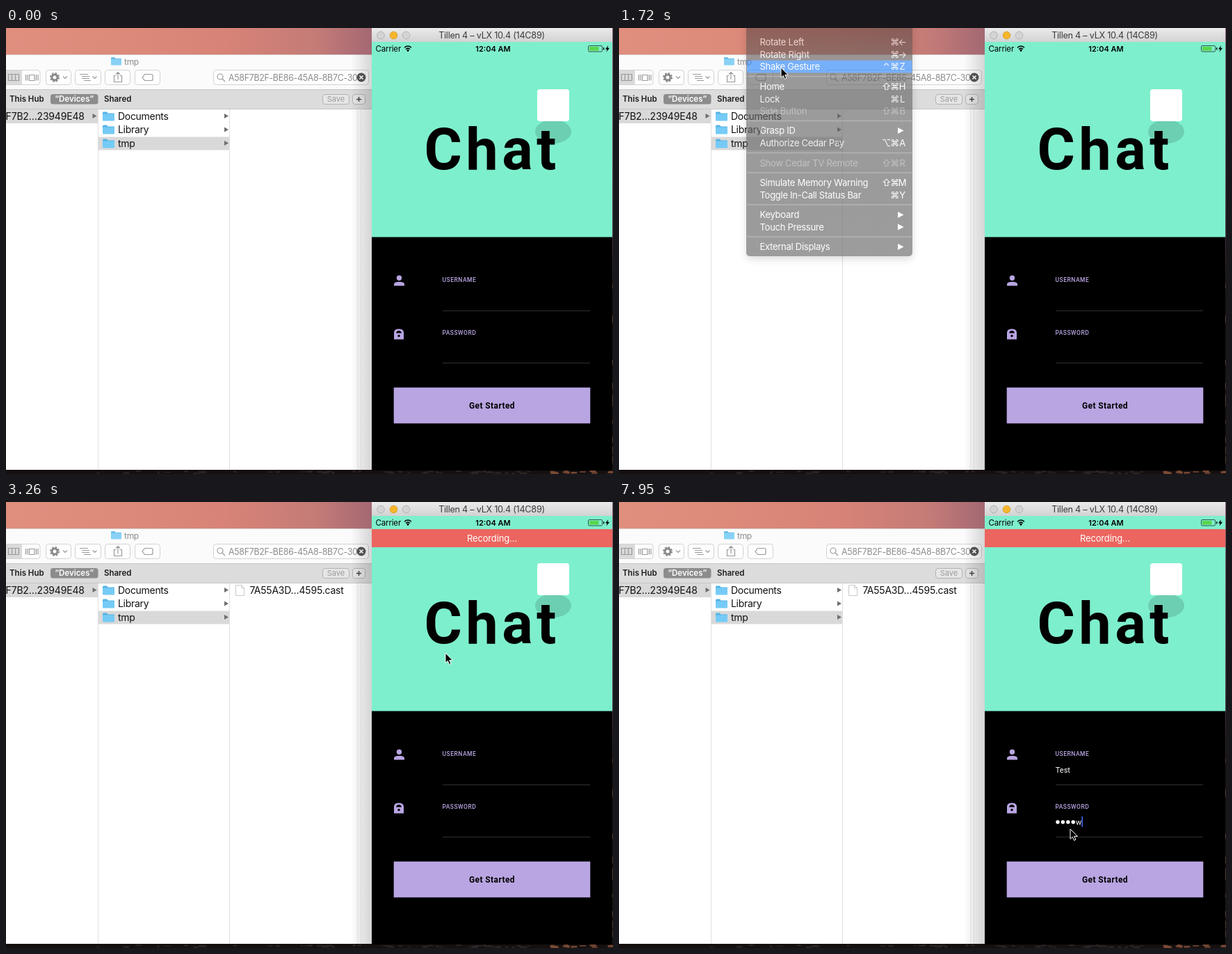
Write an HTML page that moves like this. It is 873 px wide and 641 px high and loops after 8000 ms.

```html
<!DOCTYPE html>
<html lang="en">
<head>
<meta charset="utf-8">
<title>Recording a sign-in</title>
<style>
  html, body { margin: 0; width: 100%; height: 100%; overflow: hidden; background: #15100f; }
  svg { display: block; width: 100vw; height: 100vh; }
  text { font: 14px Inter, "DejaVu Sans", sans-serif; letter-spacing: -.3px; white-space: pre; }
  .menu text { font-size: 13px; letter-spacing: -.27px; fill: #fff; }
  .menu .off text { fill: #a2a2a2; }
  .scope text { font-size: 11.5px; font-weight: 600; letter-spacing: 0; }
  .app text { font-family: Roboto, "Open Sans", sans-serif; letter-spacing: 0; }
  .app .label { font-size: 8.5px; font-weight: 500; letter-spacing: .5px; fill: #b8a5e2; }
  .app .typed { font-size: 11px; fill: #fff; }
  .mid { text-anchor: middle; }
  .end { text-anchor: end; }
  .btn { fill: #fefefe; stroke: #d2d2d2; }
  .ink { fill: none; stroke: #9a9a9a; stroke-width: 1.2; }
</style>
</head>
<body>
<svg viewBox="0 0 873 641" xmlns="http://www.w3.org/2000/svg">
  <defs>
    <linearGradient id="sky">
      <stop offset="0" stop-color="#e08f7f"/><stop offset=".3" stop-color="#dc8a7a"/>
      <stop offset=".6" stop-color="#d78377"/><stop offset=".85" stop-color="#c47b77"/>
      <stop offset="1" stop-color="#a36873"/>
    </linearGradient>
    <linearGradient id="side" x2="0" y2="1">
      <stop offset="0" stop-color="#8a6274"/><stop offset=".45" stop-color="#4a3844"/>
      <stop offset=".6" stop-color="#1c1414"/>
    </linearGradient>
    <linearGradient id="edge">
      <stop offset="0" stop-opacity="0"/><stop offset="1" stop-opacity=".15"/>
    </linearGradient>
    <linearGradient id="bar" x2="0" y2="1">
      <stop offset="0" stop-color="#ebebeb"/><stop offset="1" stop-color="#d2d2d2"/>
    </linearGradient>
    <linearGradient id="panel" x2="0" y2="1">
      <stop offset="0" stop-color="#6b4743"/><stop offset=".1" stop-color="#6a5855"/>
      <stop offset=".2" stop-color="#686666"/><stop offset="1" stop-color="#696969"/>
    </linearGradient>
    <clipPath id="search"><rect x="298" y="60" width="207" height="22"/></clipPath>
    <clipPath id="screen"><rect x="526" y="20" width="346" height="616"/></clipPath>
    <g id="folder">
      <path d="M0 1.5Q0 0 1.5 0H6L7.5 2H16Q17 2 17 3V4H0Z" fill="#55b4e6"/>
      <rect y="3" width="17" height="10" rx="1" fill="#75cbf6"/>
    </g>
    <path id="tri" d="M-3-3.5 3 0-3 3.5Z"/>
  </defs>

  <!-- desktop -->
  <rect width="527" height="40" fill="url(#sky)"/>
  <rect x="872" width="1" height="641" fill="url(#side)"/>
  <g id="dusk"></g>

  <!-- file window -->
  <rect y="38" width="526" height="597" fill="#fff"/>
  <rect y="38" width="526" height="50" fill="#fbfbfb"/>
  <path d="M0 38.5H526" stroke="#b9a5a3" stroke-opacity=".5"/>
  <use href="#folder" transform="translate(151 42) scale(.88)" opacity=".85"/>
  <text x="170" y="52.5" fill="#8a8a8a" style="font-size:12px">tmp</text>
  <g>
    <rect class="btn" x="-8" y="60.5" width="57" height="21" rx="4"/>
    <path d="M0 61H23V81H0Z" fill="#dadada"/>
    <path class="ink" d="M3.5 66.5H18.5V75.5H3.5ZM8.5 66.5V75.5M13.5 66.5V75.5M28.5 67V75.5M31 67V75.5M33.5 67.5H41V75.5H33.5ZM43.5 67V75.5M46 67V75.5"/>
    <rect class="btn" x="57.5" y="60.5" width="36" height="21" rx="4"/>
    <circle cx="70" cy="71" r="4" fill="none" stroke="#8a8a8a" stroke-width="3"/>
    <circle cx="70" cy="71" r="6" fill="none" stroke="#8a8a8a" stroke-width="2" stroke-dasharray="2.4 2.312"/>
    <rect class="btn" x="99.5" y="60.5" width="37" height="21" rx="4"/>
    <path class="ink" d="M106 66.5H118M109 69.5H120M109 72.5H120M112 75.5H122"/>
    <path class="ink" d="M82 69.5 85 72.5 88 69.5M124.5 69.5 127.5 72.5 130.5 69.5"/>
    <rect class="btn" x="142.5" y="60.5" width="36" height="21" rx="4"/>
    <path class="ink" d="M158 68.5H155.5V77.5H166.5V68.5H164M161 74V63.5M158 66.5 161 63.5 164 66.5"/>
    <rect class="btn" x="185.5" y="60.5" width="36" height="21" rx="4"/>
    <path class="ink" d="M199.5 66.5H209Q211 66.5 211 68.5V73.5Q211 75.5 209 75.5H199.5L196 71Z"/>
    <rect class="btn" x="298.5" y="60.5" width="223" height="21" rx="4"/>
    <circle class="ink" cx="308" cy="70" r="4"/><path class="ink" d="M311 73 315 77"/>
    <text x="320" y="75.5" clip-path="url(#search)" fill="#8d8d8d" style="font-size:12.4px">A58F7B2F-BE86-45A8-8B7C-30D1</text>
  </g>
  <g class="scope">
    <rect y="88" width="526" height="29" fill="#dcdcdc"/>
    <path d="M0 88.5H526M0 116.5H526" stroke="#c6c6c6"/>
    <text x="5" y="106" fill="#1c1c1c">This Hub</text>
    <rect x="64" y="95" width="68.5" height="14.5" rx="3.5" fill="#8c8c8c"/>
    <text class="mid" x="98.2" y="106" fill="#fff">“Devices”</text>
    <text x="141" y="106" fill="#1c1c1c">Shared</text>
    <rect x="455.5" y="95.5" width="38" height="14" rx="3.5" fill="#e6e6e6" stroke="#b4b4b4"/>
    <text class="mid" x="474.5" y="106" fill="#9c9c9c" style="font-size:11px;font-weight:400">Save</text>
    <rect x="498.5" y="95.5" width="18" height="14" rx="3.5" fill="#e6e6e6" stroke="#b4b4b4"/>
    <path d="M504 102.5H511M507.5 99V106" stroke="#444" stroke-width="1.5"/>
  </g>
  <path d="M0 117H132V137H0ZM133 156.5H321V175.5H133Z" fill="#d9d9d9"/>
  <path d="M132.5 117V635M321.5 117V635" stroke="#e0e0e0"/>
  <path d="M505 117H526V635H505Z" fill="#fafafa"/>
  <path d="M505.5 117V635M510.5 117V635" stroke="#ececec"/>
  <g fill="#111">
    <text class="end" x="112.7" y="132" style="letter-spacing:-.2px">F7B2…23949E48</text>
    <text x="161" y="132">Documents</text>
    <text x="161" y="151">Library</text>
    <text x="161" y="171">tmp</text>
  </g>
  <use href="#folder" x="139" y="120.5"/>
  <use href="#folder" x="139" y="139.5"/>
  <use href="#folder" x="139" y="159.5"/>
  <g fill="#6e6e6e">
    <use href="#tri" x="127.5" y="126.5"/><use href="#tri" x="317" y="126.5"/>
    <use href="#tri" x="317" y="146"/><use href="#tri" x="317" y="165.5"/>
  </g>
  <g id="file">
    <path d="M330.5 119.5H338.5L342.5 123.5V134.5H330.5ZM338.5 119.5V123.5H342.5" fill="#fff" stroke="#c9c9c9"/>
    <text x="350.5" y="132" fill="#111" style="letter-spacing:-.2px">7A55A3D…4595.cast</text>
  </g>
  <rect x="496" y="38" width="30" height="597" fill="url(#edge)"/>
  <circle cx="511" cy="71" r="6.5" fill="#505050"/>
  <path d="M508.5 68.5 513.5 73.5M513.5 68.5 508.5 73.5" stroke="#fff" stroke-width="1.5"/>

  <!-- phone window -->
  <g class="app">
    <rect x="526" width="346" height="636"/>
    <rect x="526" width="346" height="20" fill="url(#bar)"/>
    <g fill="#d4d4d4" stroke="#b2b2b2">
      <circle cx="539" cy="10.5" r="5.3"/><circle cx="575.5" cy="10.5" r="5.3"/>
      <circle cx="557.5" cy="10.5" r="5.3" fill="#f6b62c" stroke="#dc9d22"/>
    </g>
    <text class="mid" x="698.5" y="15" fill="#3c3c3c" style="font:12.7px Inter,sans-serif;letter-spacing:-.27px">Tillen 4 – vLX 10.4 (14C89)</text>
    <rect x="526" y="20" width="346" height="280.5" fill="#7eefcd"/>
    <text x="531.5" y="34" style="font:11.5px Inter,sans-serif;letter-spacing:-.15px">Carrier</text>
    <path d="M573 28.2Q578 23.8 583 28.2M575 30.5Q578 27.8 581 30.5" fill="none" stroke="#000" stroke-width="1.5"/>
    <path d="M576 32 578 30.5 580 32 578 34.2Z"/>
    <text class="mid" x="700.5" y="34" style="font:600 11px Inter,sans-serif">12:04 AM</text>
    <rect x="837.5" y="25.5" width="20" height="8.5" rx="1.5" fill="none" stroke="#2e5548"/>
    <rect x="839" y="27" width="13.5" height="5.5" fill="#58d64c"/>
    <path d="M859 28H860.3V31.5H859ZM866 25 862 30.5H864.5L863.5 34.5 868 28.7H865.2Z"/>
    <ellipse cx="787" cy="149" rx="26" ry="17" fill="#6ccfb2"/>
    <text x="601.5" y="203" style="font-size:83px;font-weight:700;letter-spacing:5.5px">Chat</text>
    <rect x="764" y="88" width="46" height="46" rx="4" fill="#fff"/>
    <g clip-path="url(#screen)">
      <g id="banner">
        <rect x="526" width="346" height="26" fill="#ec655f"/>
        <text class="mid" x="699" y="17.5" fill="#fff" style="font:13px Inter,sans-serif;letter-spacing:-.15px">Recording…</text>
      </g>
    </g>
    <g fill="#b8a5e2">
      <circle cx="565.5" cy="359.3" r="3.7"/>
      <path d="M558 370.5V368.5Q558 364.8 565.5 364.8T573 368.5V370.5Z"/>
      <path d="M558 447.5V437.5Q558.5 432.5 565 432.5T572 437.5V447.5Z"/>
    </g>
    <path d="M561 438.5Q561.5 435 565 435T569 438.5Z"/>
    <circle cx="565" cy="442.5" r="1.7"/>
    <text class="label" x="627.5" y="364.5">USERNAME</text>
    <text class="label" x="627.5" y="440.5">PASSWORD</text>
    <path d="M628 406.5H840M628 481.5H840" stroke="#303030"/>
    <rect x="557.7" y="516.7" width="282.6" height="51.6" fill="#b8a5e2"/>
    <text class="mid" x="699" y="547.2" style="font-size:12px;font-weight:700;letter-spacing:.4px">Get Started</text>
    <text class="typed" id="user" x="627.8" y="389"></text>
    <g id="dots" fill="#fff"></g>
    <text class="typed" id="pass" y="464"></text>
    <rect id="caret" width="1.6" fill="#4468e8"/>
  </g>

  <!-- menu -->
  <g class="menu" id="menu" style="filter:drop-shadow(0 4px 6px rgba(0,0,0,.22))">
    <rect x="183" y="-10" width="239" height="338" rx="5" fill="url(#panel)"/>
    <rect id="pick" x="184" width="237.5" height="17.8" fill="#3289fa"/>
  </g>

  <path id="cursor" d="M0 0V14.3L3.3 11.3 5.5 16.4 7.9 15.4 5.7 10.4H10.3Z" fill="#000" stroke="#fff"/>
</svg>
<script>
const LOOP = 8000;
const NS = 'http://www.w3.org/2000/svg';
const $ = id => document.getElementById(id);

function add(parent, tag, attrs, text) {
  const node = document.createElementNS(NS, tag);
  for (const k in attrs) node.setAttribute(k, attrs[k]);
  if (text) node.textContent = text;
  return parent.appendChild(node);
}

// label, centre y, modifier, key; '>' opens a submenu, '-' marks a disabled row
const ROWS = [
  ['Rotate Left', 20, '', '←'], ['Rotate Right', 38, '', '→'], ['Shake Gesture', 55.5, '⌃', 'Z'],
  ['Home', 84, '⇧', 'H'], ['Lock', 102, '', 'L'], ['Side Button', 119, '⇧', 'B', '-'],
  ['Grasp ID', 147.5, '>'], ['Authorize Cedar Pay', 165, '⌥', 'A'],
  ['Show Cedar TV Remote', 194, '⇧', 'R', '-'],
  ['Simulate Memory Warning', 222.5, '⇧', 'M'], ['Toggle In-Call Status Bar', 240, '', 'Y'],
  ['Keyboard', 268.5, '>'], ['Touch Pressure', 286, '>'], ['External Displays', 314.5, '>']
];
for (const [label, y, mod, key, off] of ROWS) {
  const row = add($('menu'), 'g', { class: off ? 'off' : '' });
  const base = y + 4.6;
  add(row, 'text', { x: 202.5, y: base }, label);
  if (mod === '>') {
    add(row, 'path', { d: `M401 ${y - 4.5}L409.5 ${y}L401 ${y + 4.5}Z`, fill: '#fff' });
    continue;
  }
  add(row, 'text', { x: 384.5, y: base, class: 'mid' }, mod);
  add(row, 'text', { x: 396.5, y: base, class: 'mid' }, '⌘');
  add(row, 'text', { x: 407.5, y: base, class: 'mid' }, key);
}
for (const y of [69.5, 133.5, 179.5, 208, 254, 300])
  add($('menu'), 'path', { d: `M184 ${y}H421.5`, stroke: '#8e8e8e', 'stroke-width': 1.6 });

// specks of the evening scene below the windows
let seed = 7;
const rnd = () => (seed = seed * 16807 % 2147483647) / 2147483647;
for (let i = 0; i < 70; i++) {
  const x = 130 + rnd() * 740, warm = x > 780;
  add($('dusk'), 'rect', {
    x, y: 636 + rnd() * 3, width: 3 + rnd() * 8, height: 1 + rnd() * 2,
    fill: warm ? '#7c4a36' : '#2b2425'
  });
}
for (let i = 0; i < 12; i++)
  add($('dusk'), 'rect', { x: 872, y: 300 + rnd() * 330, width: 1, height: 4 + rnd() * 8, fill: '#5a3c2e' });

const dots = [0, 1, 2, 3].map(i => add($('dots'), 'circle', { cx: 631 + i * 7.4, cy: 460, r: 2.7 }));

// start, end, number of steps, points along the way
const MOVES = [
  [780, 1130, 7, [[250, -22], [247, -12], [243, 2], [240, 16], [237, 30], [235, 43], [234, 51], [233, 57]]],
  [2190, 2780, 11, [[233, 57], [250, 60], [330, 80], [440, 112], [540, 148], [590, 168], [601, 173]]],
  [3260, 3740, 9, [[601, 173], [632, 217], [652, 258], [665, 300], [672, 340], [670, 366], [662, 384], [655, 393], [650, 397], [649, 397]]],
  [6300, 6640, 6, [[649, 397], [649, 402], [649, 417], [649, 438], [649, 456], [649, 467], [649, 470]]]
];
const BANNER = [[1900, -6], [1960, -3], [2020, 8], [2080, 22], [2130, 33], [2190, 39]];
const USER_KEYS = [5710, 5790, 5870, 5940];
const PASS_KEYS = [7470, 7530, 7710, 7830, 7950];

const clamp = v => Math.max(0, Math.min(1, v));
const pressed = (keys, t) => keys.filter(k => t >= k).length;

// share of the steps done; the first one lands right at the start
function stepped(t, from, to, n) {
  if (t < from) return 0;
  return Math.min(n, Math.floor((t - from) / (to - from) * (n - 1) + 1.001)) / n;
}

function pointer(t) {
  const [from, to, n, pts] = MOVES.filter(m => t >= m[0]).pop() || MOVES[0];
  const at = stepped(t, from, to, n) * (pts.length - 1);
  const i = Math.min(pts.length - 2, Math.floor(at));
  return [0, 1].map(k => pts[i][k] + (pts[i + 1][k] - pts[i][k]) * (at - i));
}

function set(id, attrs) {
  for (const k in attrs) $(id).setAttribute(k, attrs[k]);
}

function drawMenu(t, y) {
  set('menu', { opacity: t < 180 ? 0 : 1 - clamp((t - 1610) / 320) });
  const row = y < 11 ? -1 : Math.min(2, Math.floor((y - 11) / 18));
  const blink = t >= 1370 && t < 1430;
  set('pick', { y: 11.2 + row * 17.7, opacity: row < 0 || blink ? 0 : 1 });
}

function drawFields(t) {
  const u = pressed(USER_KEYS, t), p = pressed(PASS_KEYS, t);
  $('user').textContent = 'Test'.slice(0, u);
  $('pass').textContent = p ? 'passw'[p - 1] : '';
  const passX = 627.5 + Math.max(0, p - 1) * 7.4;
  set('pass', { x: passX });
  dots.forEach((d, i) => d.setAttribute('opacity', i < p - 1 ? 1 : 0));

  const inPass = t >= 6820;
  const x = inPass ? passX + (p ? $('pass').getComputedTextLength() : 0)
                   : 627.5 + (u ? $('user').getComputedTextLength() : 0);
  let show = t >= 4810 ? 1 : 0;
  if (t >= 5350 && t < 5710) show = 1 - stepped(t, 5350, 5530, 4);
  if (t >= 6300 && !inPass) show = 1 - stepped(t, 6300, 6480, 4);
  if (t >= 7410 && t < 7470) show = .7;
  set('caret', { x, y: inPass ? 452 : 377, height: inPass ? 15 : 16, opacity: show });
}

function draw(t) {
  const [x, y] = pointer(t);
  set('cursor', { transform: `translate(${x} ${y})` });
  drawMenu(t, y);
  const slide = BANNER.filter(b => t >= b[0]).pop() || BANNER[0];
  set('banner', { transform: `translate(0 ${slide[1]})` });
  set('file', { opacity: t >= 2370 ? 1 : 0 });
  drawFields(t);
}

const begin = performance.now();
function tick() {
  draw((performance.now() - begin) % LOOP);
  requestAnimationFrame(tick);
}
tick();
</script>
</body>
</html>
```
